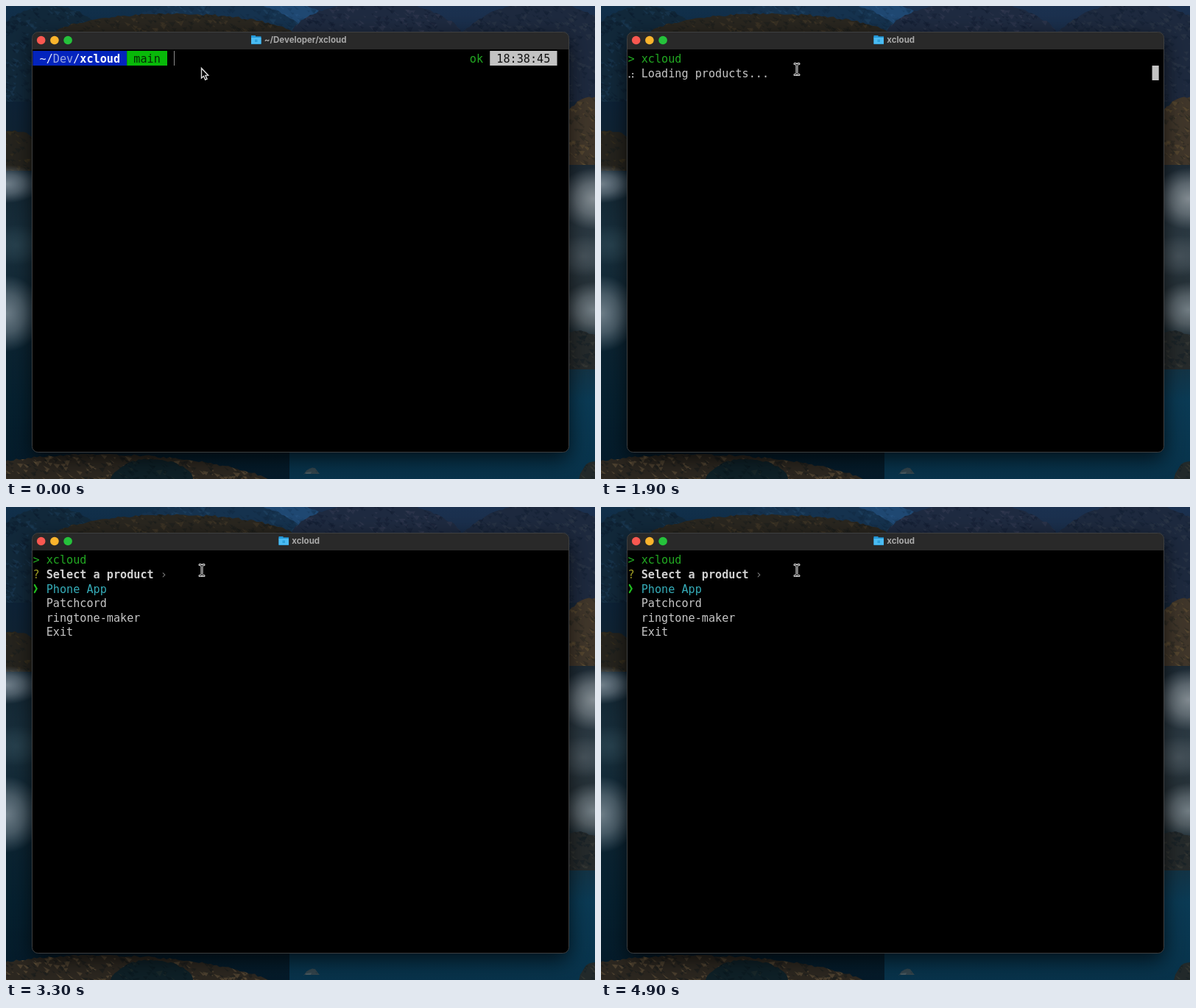
Write an HTML page with a canvas that moves like this. It is 800 px wide and 643 px high and loops after 5000 ms.

```html
<!DOCTYPE html>
<html lang="en">
<head>
<meta charset="utf-8">
<title>Terminal session</title>
<style>
  html, body { margin: 0; width: 100%; height: 100%; overflow: hidden; background: #0b2134; }
  canvas { display: block; }
</style>
</head>
<body>
<canvas id="stage" width="800" height="643"></canvas>
<script>
const W = 800, H = 643, LOOP = 5000;
const CELL = 9.13, LEFT = 36.4, ROW = 19.62, BASE = 77.3;
const MONO = '15.165px "DejaVu Sans Mono", monospace';
const GREEN = '#22a822', TEXT = '#c6c6c6', CYAN = '#35acb8', BLOCK = '#c3c3c3';
const COMMAND = 'xcloud';
const PRODUCTS = ['Phone App', 'Patchcord', 'ringtone-maker', 'Exit'];
const SPINNER = '⠋⠙⠹⠸⠼⠴⠦⠧⠇⠏';
const ENTER = 1780, LOADING = 1880, MENU = 2880;
const KEY_STEP = 200, TYPING = 380, BROWSING = 3380;

const screen = document.getElementById('stage').getContext('2d');
let ctx = screen;
let seed = 7;

const clamp = (v, lo, hi) => Math.max(lo, Math.min(hi, v));

function random() {
  seed = seed * 16807 % 2147483647;
  return seed / 2147483647;
}

function rect(color, x, y, w, h) {
  ctx.fillStyle = color;
  ctx.fillRect(x, y, w, h);
}

function disc(color, x, y, r) {
  ctx.fillStyle = color;
  ctx.beginPath();
  ctx.arc(x, y, r, 0, Math.PI * 2);
  ctx.fill();
}

function gradient(colors, x, w) {
  const fill = ctx.createLinearGradient(0, 0, 0, H);
  colors.forEach((color, i) => fill.addColorStop(i / (colors.length - 1), color));
  rect(fill, x, 0, w, H);
}

// A rugged mound, strewn with small slanted facets of light and shade.
function hill(color, x0, x1, top, bottom, light, dark) {
  const h = bottom - top;
  ctx.save();
  ctx.beginPath();
  ctx.moveTo(x0, bottom);
  for (let x = x0; x <= x1; x += 4) {
    const rise = Math.sqrt(Math.max(0, Math.sin(Math.PI * (x - x0) / (x1 - x0))));
    ctx.lineTo(x, bottom - h * rise + random() * 3);
  }
  ctx.lineTo(x1, bottom);
  ctx.fillStyle = color;
  ctx.fill();
  ctx.clip();
  ctx.globalAlpha = 0.4;
  for (let i = (x1 - x0) * h / 45; i > 0; i--) {
    const x = x0 + random() * (x1 - x0), y = top + random() * h, size = 3 + random() * 7;
    ctx.fillStyle = random() < 0.4 ? light : dark;
    ctx.beginPath();
    ctx.moveTo(x, y);
    ctx.lineTo(x + size, y + size * (random() - 0.2));
    ctx.lineTo(x + size * 0.6, y + size * 0.7);
    ctx.fill();
  }
  ctx.restore();
}

function mist(x, y, rx, ry, color) {
  ctx.save();
  ctx.translate(x, y);
  ctx.scale(rx, ry);
  const fill = ctx.createRadialGradient(0, 0, 0, 0, 0, 1);
  fill.addColorStop(0, color + 'dd');
  fill.addColorStop(0.5, color + '88');
  fill.addColorStop(1, color + '00');
  rect(fill, -1, -1, 2, 2);
  ctx.restore();
}

function landscape() {
  gradient(['#11304b', '#0c2238', '#10222f', '#182f3c', '#0d2432', '#05202f', '#041a29'], 0, 385);
  gradient(['#1b3150', '#15263c', '#1d2a34', '#2c3a43', '#20292e', '#0a3a54', '#07324a'], 385, 415);

  hill('#1f4872', 300, 450, -8, 38, '#2c5a87', '#163655');
  hill('#15324e', 150, 410, -10, 42, '#234b6c', '#10263c');
  hill('#11283a', -60, 180, -2, 130, '#1f4360', '#0a1b2b');
  hill('#29261f', 64, 390, 9, 38, '#51432c', '#15191a');
  hill('#1e2a40', 385, 620, -8, 42, '#3b4055', '#111b2d');
  hill('#1d293e', 570, 880, -8, 130, '#343c4d', '#101d30');

  hill('#25231d', -40, 64, 168, 224, '#44391f', '#12191c');
  mist(0, 242, 48, 26, '#7f8d98');
  mist(14, 325, 40, 28, '#294350');
  mist(0, 418, 50, 52, '#7b8a94');

  hill('#40362a', 740, 850, 122, 216, '#725c39', '#222320');
  mist(798, 262, 48, 42, '#8f989e');
  mist(784, 340, 45, 28, '#4a565e');
  mist(798, 413, 46, 38, '#7d8990');
  hill('#252a2b', 720, 830, 440, 494, '#45453e', '#111d24');

  hill('#2c2720', -130, 386, 608, 665, '#7d6848', '#10181b');
  hill('#0e2027', 140, 256, 614, 646, '#29342f', '#08161c');
  hill('#32444c', 404, 426, 627, 636, '#66777c', '#17272f');
  hill('#22292a', 776, 830, 616, 650, '#4d4b40', '#0f1c22');
}

function windowPath() {
  ctx.beginPath();
  ctx.roundRect(35.5, 35.5, 729, 571, 8);
}

function windowFrame() {
  ctx.save();
  ctx.shadowColor = 'rgba(0,0,0,0.7)';
  ctx.shadowBlur = 28;
  ctx.shadowOffsetY = 9;
  ctx.fillStyle = '#000';
  windowPath();
  ctx.fill();
  ctx.restore();

  ctx.save();
  ctx.clip();
  rect('#292929', 35, 35, 730, 24);
  ctx.restore();
  ctx.strokeStyle = '#3e3f40';
  ctx.stroke();
  ['#fb5850', '#fbb42d', '#25c23b'].forEach((color, i) => disc(color, 47.7 + i * 18.2, 46.5, 5.8));
}

const column = col => LEFT + col * CELL;

function text(str, col, row, color, bold) {
  ctx.font = (bold ? 'bold ' : '') + MONO;
  ctx.fillStyle = color;
  ctx.fillText(str, column(col), BASE + row * ROW);
}

function title(label, x) {
  rect('#2498d8', x, 40, 6, 4);
  rect('#2498d8', x, 41.3, 13.5, 10.5);
  rect('#4bbcf3', x, 43, 13.5, 8.5);
  rect('#2c9fda', x + 5, 45.5, 3.5, 3.5);
  ctx.font = 'bold 11.5px Inter, sans-serif';
  ctx.fillStyle = '#a8a8a8';
  ctx.fillText(label, x + 17.8, 50.2);
}

function prompt(t) {
  title('~/Developer/xcloud', 333);
  rect('#0324bd', LEFT, 61, 14 * CELL, 20);
  rect('#08b909', column(14), 61, 6 * CELL, 20);
  rect(BLOCK, column(68), 61, 10 * CELL, 20);
  text('~/   /', 1, 0, '#e8ecff');
  text('Dev', 3, 0, '#9daae0');
  text(COMMAND, 7, 0, '#ffffff', true);
  text('main', 15, 0, '#052b05');
  text('ok', 65, 0, GREEN);
  text('18:38:45', 69, 0, '#111111');

  const typed = clamp(Math.floor((t - TYPING) / KEY_STEP), 0, COMMAND.length);
  const done = typed === COMMAND.length;
  if (typed) {
    text(COMMAND.slice(typed), 21 + typed, 0, '#686868');
    text(COMMAND.slice(0, typed), 21, 0, done ? GREEN : TEXT);
    if (!done) rect(TEXT, column(21), 78, typed * CELL, 1);
  }
  rect('#8c8c8c', Math.round(column(21 + typed)), 61, 1, 20);
}

function loading(t) {
  const index = (Math.floor(t / 100) + 6) % SPINNER.length;
  const dots = SPINNER.charCodeAt(index) - 0x2800;
  for (let i = 0; i < 6; i++) {
    if (dots >> i & 1) disc(TEXT, 38.6 + Math.floor(i / 3) * 4.5, 87.6 + (i % 3) * 4.4, 1.1);
  }
  text('Loading products...', 2, 1, TEXT);
  rect(BLOCK, column(78), 81, CELL, 20);
}

// The selection walks down to the last item and back up.
function menu(t) {
  const last = PRODUCTS.length - 1;
  const step = clamp(Math.floor((t - BROWSING) / KEY_STEP), 0, 2 * last);
  const selected = last - Math.abs(last - step);
  text('?', 0, 1, '#a09e25');
  text('Select a product', 2, 1, '#d0d0d0', true);
  text('›', 19, 1, '#777777');
  PRODUCTS.forEach((name, i) => text(name, 2, i + 2, i === selected ? CYAN : TEXT));

  const y = 111 + selected * ROW;
  ctx.strokeStyle = '#20bd20';
  ctx.lineWidth = 2.2;
  ctx.beginPath();
  ctx.moveTo(38.8, y - 5);
  ctx.lineTo(41.7, y);
  ctx.lineTo(38.8, y + 5);
  ctx.stroke();
}

const ARROW = new Path2D('M265.5 84.5v13.5l3-2.7 2.2 4.9 2.3-1.1-2.1-4.7 3.8-.2z');
const BEAM = new Path2D('M263 78.5q3 0 3 2v11q0 2-3 2M269 78.5q-3 0-3 2M266 91.5q0 2 3 2');

function pointer(path, outer, inner) {
  ctx.lineCap = 'round';
  ctx.strokeStyle = '#eeeeee';
  ctx.lineWidth = outer;
  ctx.stroke(path);
  ctx.strokeStyle = '#080808';
  ctx.lineWidth = inner;
  ctx.stroke(path);
}

const backdrop = document.createElement('canvas');
backdrop.width = W;
backdrop.height = H;
ctx = backdrop.getContext('2d');
landscape();
windowFrame();
ctx = screen;

function draw(t) {
  ctx.drawImage(backdrop, 0, 0);
  if (t < ENTER) {
    prompt(t);
    pointer(ARROW, 1.4, 0.1);
    return;
  }
  title('xcloud', 370.5);
  text('>', 0, 0, GREEN);
  text(COMMAND, 2, 0, GREEN);
  if (t >= MENU) menu(t);
  else if (t >= LOADING) loading(t);
  pointer(BEAM, 3, 1);
}

const start = performance.now();
function tick() {
  draw((performance.now() - start) % LOOP);
  requestAnimationFrame(tick);
}
tick();
</script>
</body>
</html>
```
